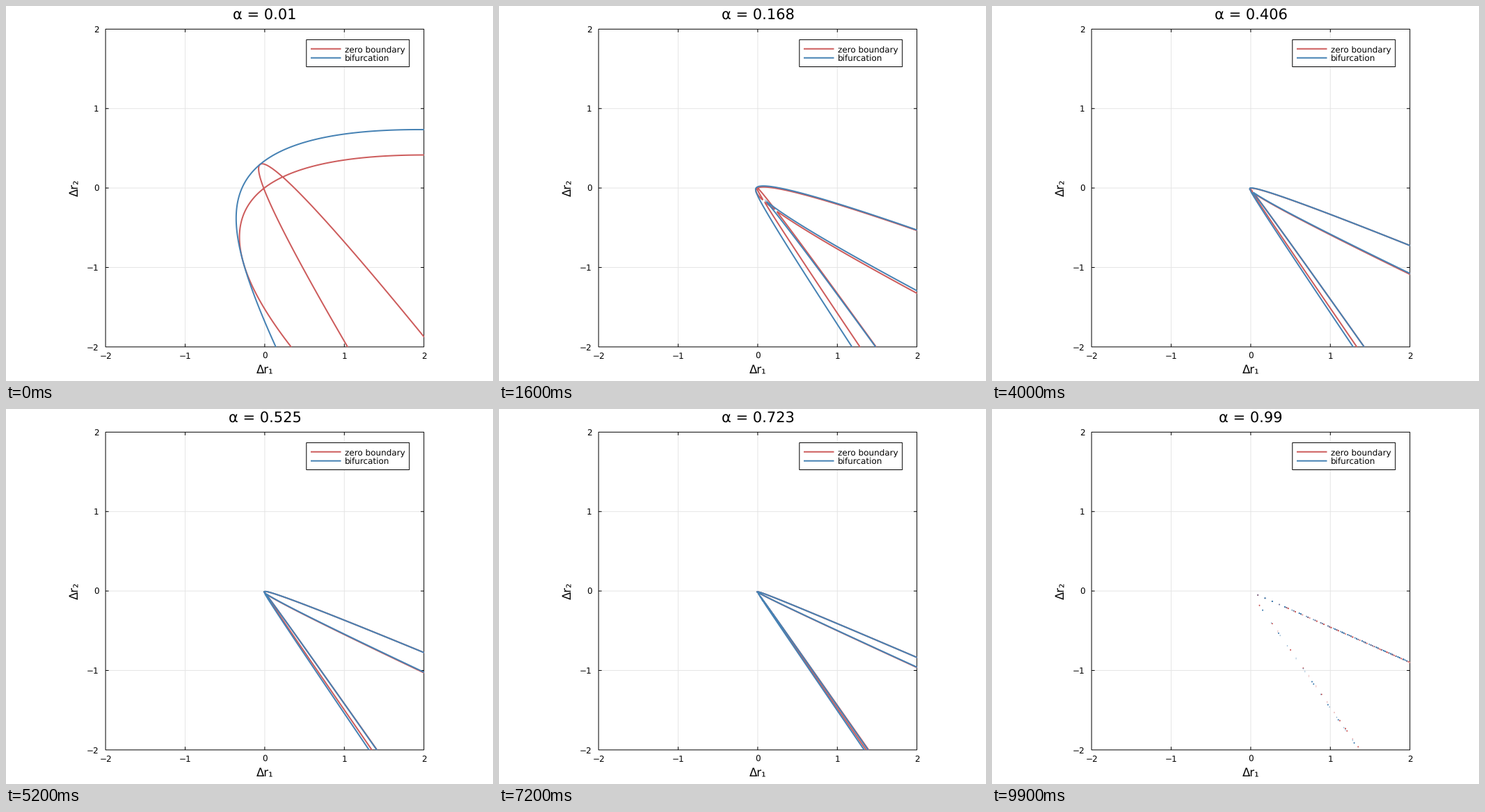
Animation of 700 by 540 pixels, one loop 10 s. Source, as a matplotlib script:

```python
import numpy as np
import matplotlib.pyplot as plt
from matplotlib.animation import FuncAnimation
from matplotlib.patches import Rectangle

W, H, DPI = 700, 540, 100
FRAMES, INTERVAL = 100, 100
RED, BLUE = "indianred", "steelblue"
LEFT, RIGHT, TOP, BOTTOM = 143.1, 600.7, 33.3, 490.9

plt.rcParams.update({"font.family": "DejaVu Sans", "text.hinting": "none",
                     "path.simplify": False})

# Steady state: dr = (1 - a) * (A u + B v) + a * (C u^2 + D v^2 + 2 u v (e C + f D)).
# All vectors are given for a = 0.01 and rewritten in the basis (C, D).
BASIS = np.array([[0.5439, 5.686], [-0.2416, -8.163]])
A1, A2 = np.linalg.solve(BASIS, [0.8153, 0.6379])
B1, B2 = np.linalg.solve(BASIS, [-1.2168, 3.1827])
E, F = -0.41, 0.010
X0, Y0 = -0.012, -0.005

# The two conics touch where the cubic det(lam * M1 + M2) has a double root.
lam = np.poly1d([1, 0])
mix = E * lam + F
b1 = np.poly1d([A1, A2]) / 2
b2 = np.poly1d([B1, B2]) / 2
K = (lam - mix ** 2).c
G = (b1 ** 2 - 2 * mix * b1 * b2 + lam * b2 ** 2).c

axis = np.linspace(-2, 2, 401)
gx, gy = np.meshgrid(axis - X0, axis - Y0)
inv = np.linalg.inv(BASIS)
C0 = inv[0, 0] * gx + inv[0, 1] * gy
D0 = inv[1, 0] * gx + inv[1, 1] * gy


def px(x):
    return LEFT + (x + 2) / 4 * (RIGHT - LEFT)


def py(y):
    return BOTTOM - (y + 2) / 4 * (BOTTOM - TOP)


def size(alpha):
    return (1 - alpha) ** 2 / alpha / (0.99 ** 2 / 0.01)


def zero_boundary(c, d):
    return (d * d + A1 * A2 * d - A2 ** 2 * c) * (c * c + B1 * B2 * c - B1 ** 2 * d)


def fold(c, d):
    p = -c * K[0] - G[0]
    q = -c * K[1] - d * K[0] - G[1]
    r = -c * K[2] - d * K[1] - G[2]
    s = -d * K[2] - G[3]
    return (18 * p * q * r * s - 4 * q * q * q * s + q * q * r * r
            - 4 * p * r * r * r - 27 * p * p * s * s)


def pt(pixels):
    return pixels * 72 / DPI


fig = plt.figure(figsize=(W / DPI, H / DPI), dpi=DPI, facecolor="white")
ax = fig.add_axes([0, 0, 1, 1])
ax.set_xlim(0, W)
ax.set_ylim(H, 0)
ax.set_axis_off()


def line(xs, ys, color="black", width=1, z=2):
    ax.plot(xs, ys, color=color, lw=pt(width), zorder=z,
            solid_capstyle="butt", snap=False)


def label(x, y, s, pixels, ha="center", **kw):
    return ax.text(x, y, s, fontsize=pt(pixels), ha=ha, va="baseline", zorder=6, **kw)


def box(x0, y0, x1, y1, z, fill):
    patch = Rectangle((x0, y0), x1 - x0, y1 - y0, facecolor=fill,
                      edgecolor="black", lw=pt(1), zorder=z, snap=False)
    ax.add_patch(patch)
    return patch


frame = box(LEFT, TOP, RIGHT, BOTTOM, 2, "none")
for k in range(-2, 3):
    x, y = px(k), py(k)
    if abs(k) < 2:
        line([x, x], [TOP, BOTTOM], "#e5e5e5", 1, 1)
        line([LEFT, RIGHT], [y, y], "#e5e5e5", 1, 1)
        line([x, x], [BOTTOM, BOTTOM - 4.5])
        line([x, x], [TOP, TOP + 4.5])
        line([LEFT, LEFT + 4.5], [y, y])
        line([RIGHT, RIGHT - 4.5], [y, y])
    name = str(k).replace("-", "\u2212")
    label(x, 507.5, name, 12)
    label(133.5, y + 4.6, name, 12, "right")

mid_x, mid_y = px(0), py(0)
label(mid_x, 528.7, "Δr₁", 16.5)
label(103.7, mid_y, "Δr₂", 16.5, rotation=90, rotation_mode="anchor")
title = label(mid_x + 0.3, 18.3, "", 21)

box(431.8, 48.6, 579.7, 87.5, 4, "white")
for y, color, name in ((61.7, RED, "zero boundary"), (74.7, BLUE, "bifurcation")):
    line([438, 481.5], [y, y], color, 2, 5)
    label(487.3, y + 4.4, name, 12, "left")

curves = []


def draw(i):
    alpha = 0.01 + 0.98 * i / (FRAMES - 1)
    t = size(alpha)
    title.set_text(f"α = {round(alpha, 3)}")
    while curves:
        curves.pop().remove()
    for func, color in ((zero_boundary, RED), (fold, BLUE)):
        cs = ax.contour(px(axis), py(axis), func(C0 / t, D0 / t), levels=[0],
                        colors=color, linewidths=pt(2), antialiased=True, zorder=3)
        cs.set(capstyle="round", joinstyle="round", snap=False)
        cs.set_clip_path(frame)
        curves.append(cs)
    return [title, *curves]


anim = FuncAnimation(fig, draw, frames=FRAMES, interval=INTERVAL,
                     init_func=lambda: [title], repeat=True, repeat_delay=0, blit=False)
plt.show()
```
